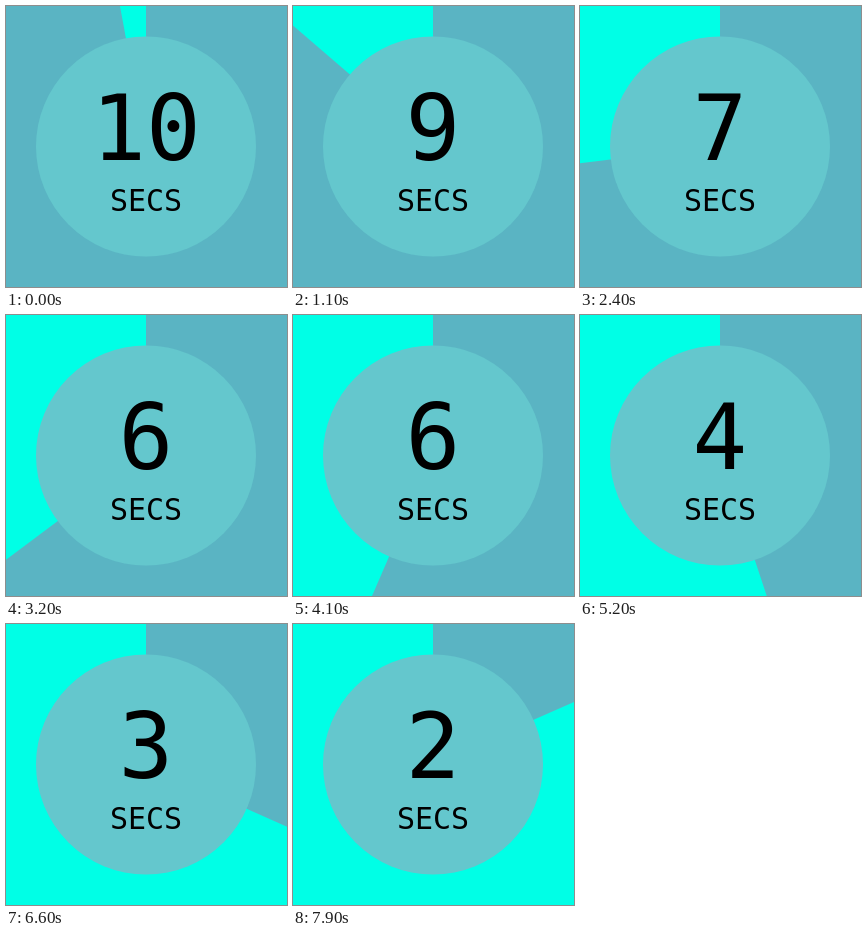
Animation of 281 by 281 pixels, one loop 8 s. Source, as an HTML page:

```html
<!DOCTYPE html>
<html lang="en">
<head>
<meta charset="utf-8">
<title>Countdown</title>
<style>
  html, body { margin: 0; width: 100%; height: 100%; overflow: hidden; background: #5ab4c3; }
  svg { display: block; width: 100vw; height: 100vh; }
  text { font-family: "DejaVu Sans Mono", monospace; text-anchor: middle; }
</style>
</head>
<body>
<svg viewBox="0 0 281 281">
  <path id="wedge" fill="#00ffe6"/>
  <circle cx="140" cy="140.5" r="110" fill="#64c7cd"/>
  <text id="count" x="140" y="154" font-size="91">10</text>
  <text x="140" y="205" font-size="30">SECS</text>
</svg>
<script>
const LOOP = 8000, FRAME = 100, CENTER = 140, REACH = 300;
const wedge = document.getElementById('wedge');
const count = document.getElementById('count');

function draw(now) {
  const frame = Math.floor((now % LOOP) / FRAME);
  // The dial ticks 12 times a second, sampled ten times a second.
  const tick = Math.floor((12 * frame + 36) / 10);
  const degrees = 1.6 + 2.981 * tick;
  const angle = degrees * Math.PI / 180;
  const x = CENTER - REACH * Math.sin(angle);
  const y = CENTER - REACH * Math.cos(angle);
  const large = degrees > 180 ? 1 : 0;
  wedge.setAttribute('d',
    `M${CENTER} ${CENTER}V${CENTER - REACH}A${REACH} ${REACH} 0 ${large} 0 ${x} ${y}Z`);
  count.textContent = 10 - Math.floor((tick + 6) / 12);
  requestAnimationFrame(() => draw(performance.now() - start));
}

const start = performance.now();
draw(0);
</script>
</body>
</html>
```
